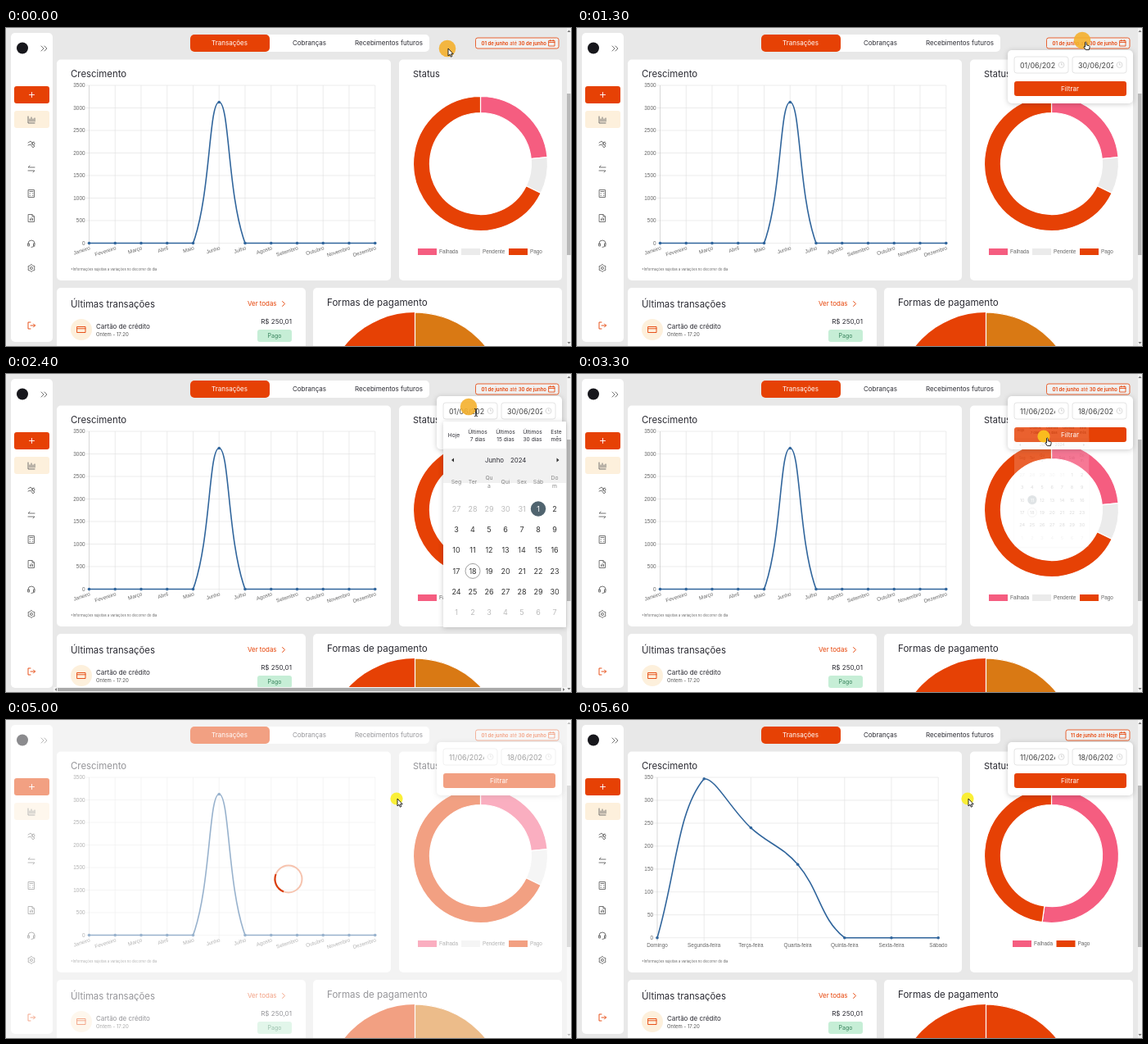
These frames come from a looping animation (690 px wide and 388 px high, 5900 ms). An HTML page:

```html
<!DOCTYPE html>
<html lang="pt-BR">
<head>
<meta charset="utf-8">
<title>Painel de transações</title>
<style>
html, body { margin: 0; height: 100%; overflow: hidden; background: #e8e8e8; }
svg#stage { display: block; width: 100vw; height: 100vh; }
text { font-family: Inter, sans-serif; white-space: pre; }
.axis text { font-family: "Liberation Sans", Arial, sans-serif; }
.icon { fill: none; stroke: #666; stroke-width: .9; stroke-linecap: round; stroke-linejoin: round; }
.shadow { filter: drop-shadow(0 1px 3px #0003); }
</style>
</head>
<body>
<svg id="stage" viewBox="0 0 690 388"></svg>
<script>
const LOOP = 5900, STEP = 100;
const ORANGE = '#e64105', PINK = '#f55d80', PALE = '#ebebeb', CREAM = '#fdf0dc', INK = '#2b2b33', GREY = '#666', BLUE = '#30659c';
const MONTHS = 'Janeiro Fevereiro Março Abril Maio Junho Julho Agosto Setembro Outubro Novembro Dezembro'.split(' ');
const DAYS = 'Domingo Segunda-feira Terça-feira Quarta-feira Quinta-feira Sexta-feira Sábado'.split(' ');
const PRESETS = [[547, 'Hoje'], [576, 'Últimos', '7 dias'], [610, 'Últimos', '15 dias'], [643, 'Últimos', '30 dias'], [672, 'Este', 'mês']];
const stage = document.getElementById('stage');

const clamp = (v, lo = 0, hi = 1) => Math.min(hi, Math.max(lo, v));
const span = (t, from, to) => clamp((t - from) / (to - from));
const lerp = (a, b, p) => a + (b - a) * p;
const smooth = p => p * p * (3 - 2 * p);
const each = (n, f) => Array.from({ length: n }, (_, i) => f(i)).join('');
const mix = (a, b, p) => `color-mix(in srgb, ${b} ${p * 100}%, ${a})`;

const box = (x0, y0, x1, y1, fill, r = 0, attrs = '') =>
  `<rect x="${x0}" y="${y0}" width="${x1 - x0}" height="${y1 - y0}" rx="${r}" fill="${fill}" ${attrs}/>`;
const disc = (x, y, r, fill, attrs = '') => `<circle cx="${x}" cy="${y}" r="${r}" fill="${fill}" ${attrs}/>`;
// y is the vertical middle of the capitals
const text = (x, y, str, size = 8, fill = INK, anchor = 'start', attrs = '') =>
  `<text x="${x}" y="${y + size * .36}" font-size="${size}" fill="${fill}" text-anchor="${anchor}" ${attrs}>${str}</text>`;
const mid = (x, y, str, size, fill, attrs) => text(x, y, str, size, fill, 'middle', attrs);
const icon = (x, y, d, attrs = '') => `<path class="icon" transform="translate(${x} ${y})" d="${d}" ${attrs}/>`;
const line = (x0, y0, x1, y1, stroke) => `<path d="M${x0} ${y0}L${x1} ${y1}" stroke="${stroke}" stroke-width=".7"/>`;

function sidebar() {
  const orange = `style="stroke:${ORANGE}"`;
  return box(6, 6, 57, 383, '#fff', 5) + disc(20, 24.5, 7, '#17171c') +
    icon(46, 25, 'M-3 -3L0 0L-3 3M1 -3L4 0L1 3') +
    box(10, 71, 53, 92, ORANGE, 3) + icon(31.5, 81.5, 'M-3 0H3M0 -3V3', 'style="stroke:#fff"') +
    box(10, 101, 53, 122, CREAM, 3) +
    icon(31, 112, 'M-4 -4V4H4M-2 2V-1M0 2V-3M2 2V-1M4 2V-2') +
    icon(31, 142, 'M-4 -2L-1 -4L1 -2L3 -3M-4 1L-1 0L2 4L4 2L0 -1M1 -1a1.5 1.5 0 1 0 3 0a1.5 1.5 0 1 0 -3 0') +
    icon(31, 172, 'M4 -2H-4L-2 -4M-4 2H4L2 4') +
    icon(31, 202, 'M-3.5 -4.5H3.5V4.5H-3.5ZM-2 -2.5H2M-2 0H-1.5M1.5 0H2M-2 2.5H-1.5M1.5 2.5H2') +
    icon(31, 232, 'M-3.5 -4.5H1L3.5 -2V4.5H-3.5ZM1 -4.5V-2H3.5M-1.5 2.5V1M0 2.5V-.5M1.5 2.5V.5') +
    icon(31, 263, 'M-4 1V0A4 4 0 0 1 4 0V2Q4 4 0 4.5M-4 0H-2.5V3H-4ZM4 0H2.5V3H4') +
    icon(31, 293, 'M0 -4.5L1.5 -3.2L4 -2.3L3.6 0L4 2.3L1.5 3.2L0 4.5L-1.5 3.2L-4 2.3L-3.6 0L-4 -2.3L-1.5 -3.2ZM-1.5 0a1.5 1.5 0 1 0 3 0a1.5 1.5 0 1 0 -3 0') +
    icon(31, 363, 'M-1 -4H-4V4H-1M-1 0H4.5L2.5 -2M4.5 0L2.5 2', orange);
}

function page() {
  const orange = `style="stroke:${ORANGE}"`;
  return box(0, 0, 690, 388, '#e8e8e8') + sidebar() +
    box(225, 8, 517, 29, '#fff', 5) + box(225, 8, 322, 29, ORANGE, 5) +
    mid(273, 18.5, 'Transações', 8, '#fff') + mid(370.5, 18.5, 'Cobranças') + mid(467.5, 18.5, 'Recebimentos futuros') +
    box(62, 38.5, 470, 308, '#fff', 5) + box(480, 38.5, 679, 308, '#fff', 5) +
    box(62, 317, 366, 400, '#fff', 5) + box(375, 317, 679, 400, '#fff', 5) +
    text(79, 56, 'Crescimento', 11.4) + text(497, 56, 'Status', 11) +
    text(79, 294, '*Informações sujeitas a variações no decorrer do dia', 4.2, GREY) +
    text(79, 336.5, 'Últimas transações', 11.4) + text(392, 335, 'Formas de pagamento', 11.6) +
    text(295, 336.5, 'Ver todas', 7.9, ORANGE) + icon(339, 336.5, 'M-1.5 -3L1.5 0L-1.5 3', orange) +
    disc(92, 368, 13, CREAM) + icon(92, 368, 'M-5 -3.5H5V3.5H-5ZM-5 -1.2H5', orange) +
    text(110, 364, 'Cartão de crédito', 8) + text(110, 373.5, 'Ontem - 17:20', 6, '#555') +
    text(349, 358, 'R$ 250,01', 8.1, INK, 'end') +
    box(307, 368, 349, 383, '#c6eed6', 3) + mid(328, 375.5, 'Pago', 7, '#35805a') +
    box(685, 0, 690, 388, '#f4f4f4') + box(685, 80, 689.5, 277, '#b9b9b9') +
    `<path d="M685.5 5l2 -2.5l2 2.5zM685.5 383l2 2.5l2 -2.5z" fill="#777"/>`;
}

// Cardinal spline with tension .4, control points kept inside the plot
function spline(pts, bottom) {
  const ctrl = pts.map((b, i) => {
    const a = pts[i - 1] || b, c = pts[i + 1] || b;
    const before = Math.hypot(b[0] - a[0], b[1] - a[1]), after = Math.hypot(c[0] - b[0], c[1] - b[1]);
    const at = d => [b[0] + (c[0] - a[0]) * d, clamp(b[1] + (c[1] - a[1]) * d, 70, bottom)];
    const k = .4 / (before + after || 1);
    return { in: at(-k * before), out: at(k * after) };
  });
  return 'M' + pts[0] + pts.slice(1).map((p, i) => `C${ctrl[i].out} ${ctrl[i + 1].in} ${p}`).join('');
}

const monthly = MONTHS.map((_, i) => [101.5 + i * 31.75, i === 5 ? 90.5 : 262.5]);
const weekly = [0, 347, 240, 160, 0, 0, 0].map((v, i) => [98 + i * 57.2, 265.7 - v * .559]);

function growth(filtered, p) {
  const pts = filtered ? weekly.map((w, i) => w.map((v, k) => lerp(monthly[i][k], v, p))) : monthly;
  const grid = filtered ? weekly : monthly;
  const left = grid[0][0], right = grid.at(-1)[0], bottom = filtered ? 265.7 : 262.5, rowGap = (bottom - 70) / 7;
  return '<g class="axis">' +
    each(8, i => {
      const y = bottom - i * rowGap;
      return line(left - 4, y, right, y, '#e4e4e4') + text(left - 5, y, i * (filtered ? 50 : 500), 6.4, GREY, 'end');
    }) +
    grid.map(([x], i) => line(x, 70, x, bottom + 4, i ? '#e4e4e4' : '#c8c8c8') + (filtered
      ? mid(x, 275, DAYS[i], 6.4, GREY)
      : text(x + 1, 268, MONTHS[i], 6.4, GREY, 'end', `transform="rotate(-18 ${x + 1} 268)"`))).join('') +
    `<path d="${spline(pts, bottom)}" fill="none" stroke="${BLUE}" stroke-width="1.6"/>` +
    pts.map(([x, y]) => disc(x, y, 1.8, BLUE)).join('') + '</g>';
}

function slice(from, to, fill) {
  const at = (deg, r) => {
    const a = deg * Math.PI / 180;
    return [579.5 + r * Math.sin(a), 165.5 - r * Math.cos(a)];
  };
  const big = +(to - from > 180);
  return `<path d="M${at(from, 82)}A82 82 0 ${big} 1 ${at(to, 82)}L${at(to, 62)}A62 62 0 ${big} 0 ${at(from, 62)}Z"
    style="fill:${fill}" stroke="#fff" stroke-width="1.2"/>`;
}

function status(filtered, p) {
  const split = lerp(84.5, 188, p);
  const legend = filtered
    ? [[532, PINK, 'Falhada'], [585.5, ORANGE, 'Pago']]
    : [[503, PINK, 'Falhada'], [556, PALE, 'Pendente'], [614, ORANGE, 'Pago']];
  return slice(0, split, PINK) + slice(split, lerp(116, 360, p), mix(PALE, ORANGE, p)) +
    (filtered ? '' : slice(116, 360, ORANGE)) +
    '<g class="axis">' + legend.map(([x, fill, name]) =>
      box(x, 269, x + 23, 277, fill) + text(x + 26, 273, name, 6.4, GREY)).join('') + '</g>' +
    disc(499.5, 457.5, 110.5, ORANGE) +
    `<path d="M499.5 347a110.5 110.5 0 0 1 110.5 110.5h-110.5z" style="fill:${mix('#d97914', ORANGE, p)}" stroke="#fff" stroke-width="1.2"/>`;
}

function dateButton(filtered) {
  const [from, to, x] = filtered ? ['11 de junho', 'Hoje', 597] : ['01 de junho', '30 de junho', 573.5];
  const bold = s => `<tspan font-weight="600">${s}</tspan>`;
  return box(x, 12, 675, 25, '#f1f1f1', 2.5, `stroke="${ORANGE}" stroke-width=".8"`) +
    text(660, 18.5, `${bold(from)} até ${bold(to)}`, 6, ORANGE, 'end') +
    icon(666.5, 18.5, 'M-3.5 -3H3.5V3.5H-3.5ZM-3.5 -1H3.5M-1.7 -4V-2.5M1.7 -4V-2.5', `style="stroke:${ORANGE};stroke-width:.8"`);
}

function popup(picked) {
  const field = (x, value) => box(x, 35, x + 66, 55, '#fff', 3, 'stroke="#ddd" stroke-width=".8"') +
    `<svg x="${x}" y="35" width="50" height="20">${text(7, 10.5, value, 8.9, '#444')}</svg>` +
    icon(x + 57.5, 45, 'M-3.5 0a3.5 3.5 0 1 0 7 0a3.5 3.5 0 1 0 -7 0M0 -2V0H1.5', 'style="stroke:#ccc;stroke-width:.7"');
  return box(526, 27, 679, 92, '#fff', 5, 'class="shadow"') +
    field(534, picked ? '11/06/2024' : '01/06/2024') + field(605, picked ? '18/06/2024' : '30/06/2024') +
    box(534, 65, 671, 83, ORANGE, 3) + mid(602, 74, 'Filtrar', 8, '#fff');
}

function calendar(picked, scale, opacity) {
  const selected = picked ? 11 : 1;
  const cell = i => {
    const n = i - 4, x = 550 + i % 7 * 20, y = 164.5 + Math.floor(i / 7) * 25.3;
    const inMonth = n > 0 && n < 31, on = n === selected;
    return (on ? disc(x, y, 9.2, '#50646f') : '') +
      (n === 18 ? disc(x, y, 9, 'none', 'stroke="#888" stroke-width=".8"') : '') +
      mid(x, y, n < 1 ? n + 31 : n > 30 ? n - 30 : n, 9, on ? '#fff' : inMonth ? '#333' : '#bbb');
  };
  const weekday = (name, i) => name.split('/').map((part, k, all) =>
    mid(550 + i * 20, 131.5 + (k - (all.length - 1) / 2) * 10, part, 6.8, '#888')).join('');
  return `<g opacity="${opacity}" transform="translate(534 58) scale(${scale}) translate(-534 -58)">` +
    box(534, 58, 684, 309, '#fff', 1, 'class="shadow"') + box(534, 91, 684, 133, '#f1f1f1') +
    PRESETS.map(([x, a, b]) => b ? mid(x, 70.5, a, 6.6) + mid(x, 79.5, b, 6.6) : mid(x, 75, a, 6.6)).join('') +
    '<path d="M547 102.5v5l-3 -2.5zM672.5 102.5v5l3 -2.5z" fill="#333"/>' +
    text(585, 105, 'Junho', 7.8) + text(616, 105, '2024', 7.8) +
    ['Seg', 'Ter', 'Qu/a', 'Qui', 'Sex', 'Sáb', 'Do/m'].map(weekday).join('') + each(42, cell) + '</g>';
}

const bottomScrollbar = () => box(58, 382, 685, 388, '#f4f4f4') + box(63, 383, 678, 387, '#a9a9a9') +
  '<path d="M62 383l-2.5 2l2.5 2zM680 383l2.5 2l-2.5 2z" fill="#777"/>';

const loading = t => box(0, 0, 690, 388, '#fff', 0, 'opacity=".5"') + '<g transform="translate(345 194)" fill="none" stroke-width="2">' +
  '<circle r="16.5" stroke="#f6c3ae"/>' +
  `<path d="M11.7 -11.7A16.5 16.5 0 0 1 11.7 11.7" stroke="#d93c0b" transform="rotate(${-24 + (t - 4000) * .54})"/></g>`;

// start, end, destination of the pointer
const MOVES = [[300, 1000, 617, 15], [1600, 2200, 565, 40], [2600, 3100, 570, 76], [3400, 3700, 611, 72], [4000, 4600, 477, 96]];
const ARROW = '<path d="M1 0v9l2 -1.8l1.3 3l1.5 -.7l-1.3 -2.8h2.7z" fill="#fff" stroke="#111" stroke-width=".9"/>';
const HAND = '<path d="M3.5 2.5q1 -1 1.7 .3v3l3.2 .8q1 .5 .7 2l-.8 3h-4l-2.5 -3.5q.3 -1.2 1.7 0z" fill="#fff" stroke="#111" stroke-width=".9"/>';
const BEAM = '<path d="M7 2.5q2 0 2 1v7q0 1 -2 1M11 2.5q-2 0 -2 1v7q0 1 2 1M8 7h2" fill="none" stroke="#222" stroke-width="1"/>';

function pointer(t) {
  let x = 539, y = 25;
  for (const [from, to, tx, ty] of MOVES) {
    const p = smooth(span(t, from, to));
    x = lerp(x, tx, p);
    y = lerp(y, ty, p);
  }
  const shape = t < 900 ? ARROW : t < 2000 ? HAND : t < 2800 ? BEAM : t < 4000 ? HAND : ARROW;
  const fill = t < 2500 ? '#f4b02e' : t < 3400 ? '#fcc51d' : '#fbee22';
  return `<g transform="translate(${x} ${y})">${disc(0, 0, t < 2500 ? 10.3 : 7.6, fill, 'opacity=".9"')}${shape}</g>`;
}

const background = page();

function scene(t) {
  const filtered = t >= 5100, picked = t >= 3200;
  const p = 1 - (1 - span(t, 5050, 5650)) ** 4;
  const hidden = t < 2800 ? 1 - span(t, 2200, 2400) : span(t, 3150, 3330);
  return background + growth(filtered, p) + status(filtered, p) + dateButton(filtered) +
    (t >= 1300 ? popup(picked) : '') +
    (hidden < 1 ? calendar(picked, 1 - .47 * hidden, 1 - hidden) : '') +
    (t >= 2300 && !picked ? bottomScrollbar() : '') +
    (t >= 4000 && !filtered ? loading(t) : '') + pointer(t);
}

let shown = -1;
function tick() {
  const t = Math.floor(performance.now() % LOOP / STEP) * STEP;
  if (t !== shown) stage.innerHTML = scene(shown = t);
  requestAnimationFrame(tick);
}
tick();
</script>
</body>
</html>
```
